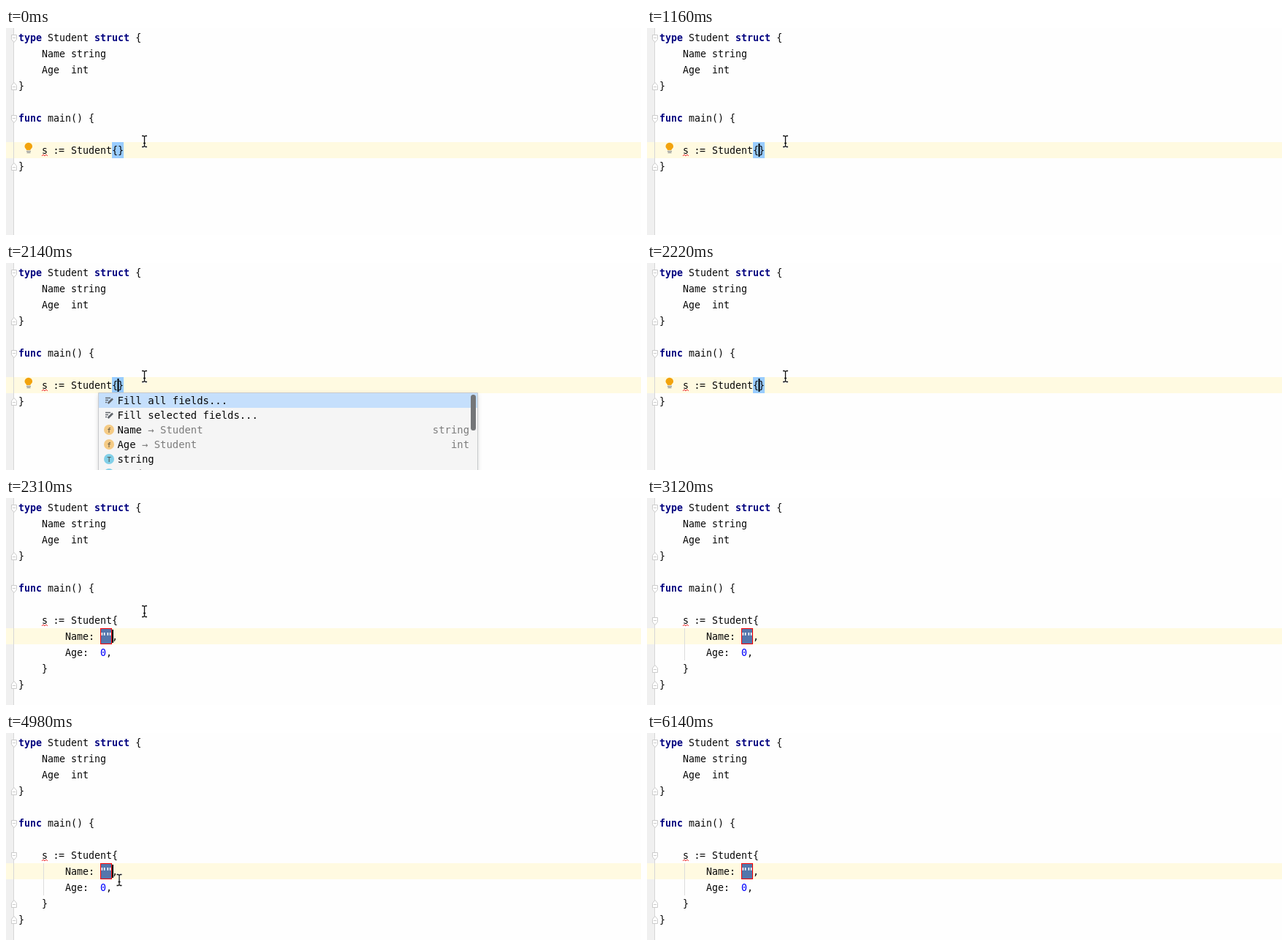
Animation of 869 by 283 pixels, one loop 6.28 s. Source, as an HTML page:

```html
<!DOCTYPE html>
<html lang="en">
<head>
<meta charset="utf-8">
<title>Fill struct fields</title>
<style>
  html, body { margin: 0; width: 100%; height: 100%; overflow: hidden; background: #fefefe; }
  svg { display: block; }
  text { font: 13.3px "DejaVu Sans Mono", "Noto Sans Mono", monospace; white-space: pre; fill: #080808; }
  .key { font-weight: 700; fill: #000080; }
  #popup text { font-size: 13.9px; }
  #popup .dim { fill: #7c7c7c; }
  #popup .badge { font-size: 9.5px; text-anchor: middle; fill: #4a4338; }
  .fold { fill: #fff; stroke: #cbcbcb; }
</style>
</head>
<body>
<svg width="869" height="283" viewBox="0 0 869 283">
  <defs>
    <path id="open" class="fold" d="M-3.5-4.5h7v6l-3.5 4-3.5-4zM-2-.5h4"/>
    <path id="close" class="fold" d="M-3.5 5.5h7v-6l-3.5-4-3.5 4zM-2 1.5h4"/>
    <g id="pencil" fill="none" stroke="#60656b" stroke-width="1.3">
      <path d="M-5-3.5h7M-5-.5h4M-5 2.5h2"/>
      <path d="M-1.5 4l6.5-6.5" stroke-width="2.6"/>
    </g>
    <path id="beam" d="M-3.5-7.5h2l1.5 1 1.5-1h2M0-6.5v13M-3.5 7.5h2l1.5-1 1.5 1h2M-1.5 2.5h3"/>
    <filter id="shadow" x="-5%" width="110%" y="-10%" height="120%">
      <feDropShadow dx="0" dy="2" stdDeviation="3" flood-opacity=".2"/>
    </filter>
  </defs>

  <rect width="10.5" height="283" fill="#f0f0f0"/>
  <rect id="row" width="869" height="22" fill="#fffae1"/>
  <path d="M10.5 0v283" stroke="#d6d6d6"/>

  <text x="17" y="18"><tspan class="key">type</tspan> Student <tspan class="key">struct</tspan> {</text>
  <text x="49" y="40">Name string</text>
  <text x="49" y="62">Age  int</text>
  <text x="17" y="84">}</text>
  <text x="17" y="128"><tspan class="key">func</tspan> main() {</text>
  <use href="#open" x="11" y="14"/>
  <use href="#close" x="11" y="79"/>
  <use href="#open" x="11" y="124"/>

  <rect id="match" x="145" y="156" width="16" height="22" fill="#99ccff"/>
  <text x="49" y="172">s <tspan x="64.5 72">:=</tspan><tspan x="89">Student{</tspan></text>
  <path d="M49 175l2-2 2 2 2-2 2 2" fill="none" stroke="#f03030"/>

  <g id="before">
    <text x="153" y="172">}</text>
    <text x="17" y="194">}</text>
    <use href="#close" x="11" y="189"/>
    <path d="M28 167c0-2-2.5-2.5-2.5-5a5.3 5.3 0 0 1 10.6 0c0 2.5-2.6 3-2.6 5z" fill="#f2a30c"/>
    <path d="M28 168.500h6M28.500 170.500h5" stroke="#777b80"/>
  </g>

  <g id="after">
    <text x="81" y="194">Name:<tspan x="145">,</tspan></text>
    <rect x="129.5" y="178.5" width="15" height="21" fill="#5476ac" stroke="#f00"/>
    <text x="129" y="194" style="fill:#fff;font-weight:700">""</text>
    <text x="81" y="216">Age:  <tspan fill="#00f" style="fill:#00f">0</tspan>,</text>
    <text x="49" y="238">}</text>
    <text x="17" y="260">}</text>
    <use href="#close" x="11" y="255"/>
  </g>

  <g id="folds">
    <use href="#open" x="11" y="168"/>
    <use href="#close" x="11" y="233"/>
    <path d="M51.5 178v44" stroke="#dcdcdc"/>
  </g>

  <g id="popup">
    <rect x="127" y="178" width="518" height="120" fill="#f5f5f5" filter="url(#shadow)"/>
    <rect x="127" y="178" width="518" height="20" fill="#c5dffc"/>
    <path d="M126.5 283V177.5h519V283" fill="none" stroke="#c9cbcd"/>
    <use href="#pencil" x="141" y="188"/>
    <use href="#pencil" x="141" y="208"/>
    <text x="152.5" y="193">Fill all fields...</text>
    <text x="152.5" y="213">Fill selected fields...</text>
    <text x="152.5" y="233">Name <tspan class="dim">→ Student</tspan></text>
    <text x="152.5" y="253">Age <tspan class="dim">→ Student</tspan></text>
    <text x="152.5" y="273">string</text>
    <text x="152.5" y="293" class="dim">Student</text>
    <text x="634" y="233" class="dim" text-anchor="end">string</text>
    <text x="634" y="253" class="dim" text-anchor="end">int</text>
    <g fill="#f5cb85"><circle cx="141" cy="228" r="7"/><circle cx="141" cy="248" r="7"/></g>
    <g fill="#82d0e8"><circle cx="141" cy="268" r="7"/><circle cx="141" cy="288" r="7"/></g>
    <text class="badge" x="141" y="231.5">f</text>
    <text class="badge" x="141" y="251.5">f</text>
    <text class="badge" x="141" y="271.5">T</text>
    <rect x="636" y="180" width="7" height="49" rx="3.5" fill="#747678"/>
  </g>

  <rect id="caret" width="2" height="18"/>
  <g id="mouse" fill="none">
    <use href="#beam" stroke="#fff" stroke-width="3"/>
    <use href="#beam" stroke="#111" stroke-width="1.3"/>
  </g>
</svg>
<script>
const LOOP = 6280, FILLED = 2310;
const blinks = [90, 630, 1160, 1600, 2140, 3120, 3660, 4200, 4540, 5060, 5600, 6140];
// Pointer stops: time, x, y; a bare time hides it.
const stops = [
  [0, 189.5, 155], [2760, 230, 168], [2850, 375, 213], [2940, 503, 253], [3120],
  [4020, 788, 271], [4110, 600, 262], [4200, 420, 249], [4270, 337.5, 239],
  [4450, 315, 236], [4540, 270, 232], [4630, 215, 226], [4720, 160, 218],
  [4810, 121, 210], [4880, 130, 205], [4970, 155, 201], [5060, 177.5, 199], [5150]
];
const el = id => document.getElementById(id);
const show = (id, on) => el(id).style.display = on ? "" : "none";

function draw() {
  const t = performance.now() % LOOP, filled = t >= FILLED;
  show("before", !filled);
  show("match", !filled);
  show("after", filled);
  show("folds", t >= 2580);
  show("popup", t >= 1250 && t < 2220);
  el("row").setAttribute("y", filled ? 178 : 156);

  show("caret", blinks.filter(b => b <= t).length % 2);
  el("caret").setAttribute("x", filled ? 145 : 152.5);
  el("caret").setAttribute("y", filled ? 180 : 158);

  const [, x, y] = stops.findLast(s => s[0] <= t);
  show("mouse", x !== undefined);
  if (x !== undefined) el("mouse").setAttribute("transform", `translate(${x} ${y})`);
  requestAnimationFrame(draw);
}
draw();
</script>
</body>
</html>
```
